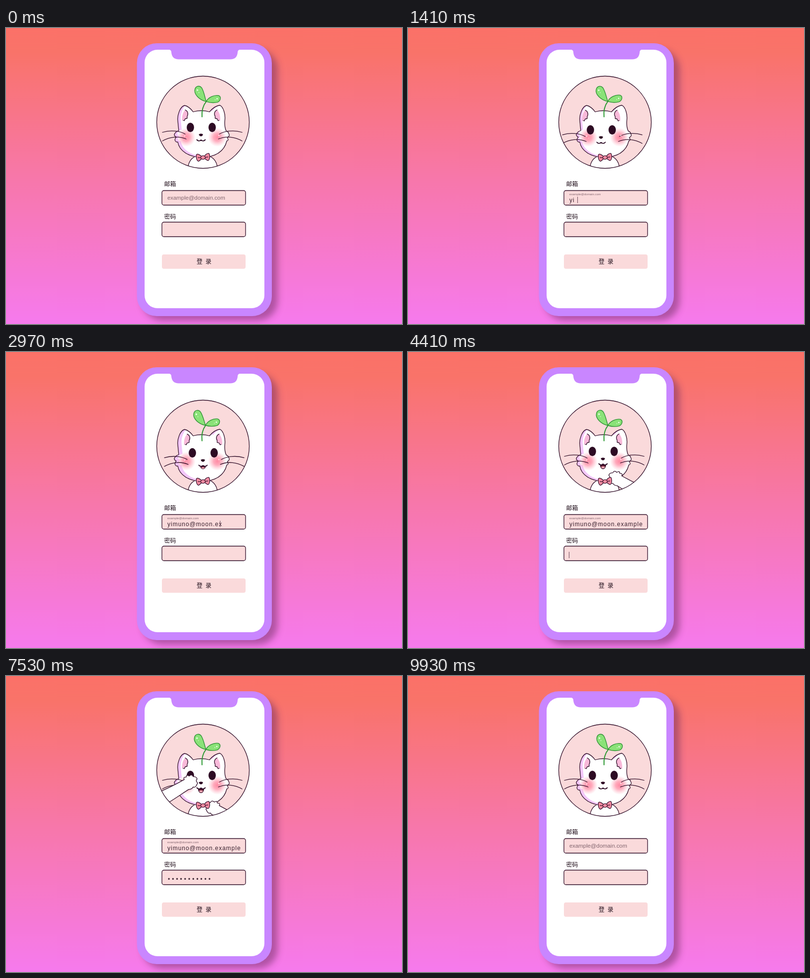
Write an HTML page that moves like this. It is 800 px wide and 600 px high and loops after 9.96 s.

```html
<!DOCTYPE html>
<html lang="zh-CN">
<head>
<meta charset="utf-8">
<title>登录</title>
<style>
  html, body { margin: 0; height: 100%; overflow: hidden; }
  svg { display: block; width: 800px; height: 600px; }
  text { font-family: "Liberation Sans", Arial, sans-serif; fill: #3a2330; }
  .label { font: 12px "Noto Sans CJK SC", "Noto Sans CJK", sans-serif; fill: #22101c; }
  .ink { stroke: #32102a; stroke-width: 1.3; stroke-linejoin: round; stroke-linecap: round; }
  .line { fill: none; }
  .skin { fill: #fff; }
  .box { fill: #fadadb; }
  .leaf { fill: #8ae278; stroke: #2f9135; stroke-width: 1.4; }
  .cursor { stroke: #6b4a5c; stroke-width: 1; }
</style>
</head>
<body>
<svg viewBox="0 0 800 600">
  <defs>
    <linearGradient id="sky" x2="0" y2="1">
      <stop stop-color="#fb7168"/><stop offset=".08" stop-color="#f97369"/>
      <stop offset=".5" stop-color="#f777a9"/><stop offset="1" stop-color="#f67aed"/>
    </linearGradient>
    <radialGradient id="blush">
      <stop stop-color="#ff8ba4"/><stop offset=".4" stop-color="#ff9bb0" stop-opacity=".85"/>
      <stop offset="1" stop-color="#ffb4c4" stop-opacity="0"/>
    </radialGradient>
    <filter id="blur" x="-20%" y="-20%" width="140%" height="140%"><feGaussianBlur stdDeviation="7"/></filter>
    <clipPath id="disc"><circle cx="398" cy="191" r="93.5"/></clipPath>
    <path id="head" d="M378 170 C374 164 367 158 361 157 C351 159 346 178 347 187 Q348 199 349 208 Q343 210 341 214 Q338 218 344 221 Q340 225 342 229 Q344 232 347 231 C350 249 369 262 396 262 C423 262 441 250 446 229 Q451 228 447 222 Q453 219 450 214 Q449 210 445 209 Q441 200 442 188 C444 175 439 160 432 156.500 Q421 158 411 170 Q395 165 378 170Z"/>
    <clipPath id="inHead"><use href="#head"/></clipPath>
    <path id="arm" class="skin ink" d="M290 228 C320 216 345 203 359 195 Q356 190 363 190 Q363 184 369 188 Q374 183 377 189 Q384 189 385 194 Q381 197 386 202 Q384 206 383 208 Q380 212 377 210 Q374 215 368 215 C354 224 337 236 320 246 L296 262Z"/>
    <g id="innerEar" class="ink" stroke-width="1">
      <path d="M362 166 C356 172 355 182 356 189 L358 186 L361 188 L362 183 L366 183 L366 179 C370 174 366 168 362 166Z" fill="#f8b9d9" stroke="none"/>
      <path class="line" d="M362 166 C367 168 369 174 366 179 L366 183 L362 184 L360 188 L358 187"/>
    </g>
    <g id="whiskers"><path d="M316 211.500 C333 206 352 209 362 215 M316 229 C330 221 348 218 364 225"/></g>
    <path id="wing" d="M396 261 C390 254 386 254 385 256 C383.500 262 385 268 388 269.500 C391 269 393 266 396 264Z"/>
  </defs>

  <rect width="800" height="600" fill="url(#sky)"/>
  <rect x="276" y="44" width="273" height="549" rx="40" fill="#6b2a60" opacity=".5" filter="url(#blur)"/>
  <rect x="264.500" y="31" width="272.500" height="553" rx="40" fill="#c986ff"/>
  <rect x="280" y="44" width="242" height="524" rx="26" fill="#fff"/>
  <path d="M328 43.500 Q334 44 334 49 Q335 63.500 349 63.500 H453 Q467 63.500 468 49 Q468 44 474 43.500Z" fill="#c986ff"/>

  <g clip-path="url(#disc)">
    <circle cx="398" cy="191" r="94" class="box"/>
    <path class="skin ink" d="M367 288 C368 267 379 257 397 258 C415 257 427 267 427.500 288Z"/>
    <g clip-path="url(#inHead)">
      <use href="#head" fill="#f3c6fb"/>
      <use id="light" href="#head" fill="#fff"/>
      <circle cx="364" cy="221.500" r="19" fill="url(#blush)"/>
      <circle cx="427" cy="221.500" r="19" fill="url(#blush)"/>
      <g id="ears"><use href="#innerEar"/><use href="#innerEar" transform="matrix(-1 0 0 1 788.500 0)"/></g>
    </g>
    <use href="#head" class="line ink"/>
    <g id="face">
      <g class="ink line"><use href="#whiskers"/><use href="#whiskers" transform="matrix(-1 0 0 1 793 0)"/></g>
      <g fill="#2d0b23">
        <ellipse cx="372.500" cy="201.500" rx="7.400" ry="9.600"/>
        <ellipse cx="416.500" cy="201.500" rx="7.400" ry="9.600"/>
        <path d="M389.500 215.500 Q394 213 398 215.500 Q397 219.500 394 219.500 Q390.500 219.500 389.500 215.500Z"/>
      </g>
      <g id="mouth">
        <path class="ink" d="M388.500 228.500 C388.500 239.500 399.500 239.500 399.500 228.500 Q396.500 230.500 394 228 Q391 230.500 388.500 228.500Z" fill="#5a1730"/>
        <path d="M390 233 Q394 230.500 398 233 Q397 236 394 236 Q391 236 390 233Z" fill="#f7a8b4"/>
      </g>
      <path class="ink line" stroke-width="1.800" style="stroke-width:1.900" d="M385.500 226.500 Q389.500 231 394 227 Q398.500 231 402.500 226.500"/>
    </g>
    <g fill="#fff" opacity=".75"><circle cx="361" cy="219" r="1.200"/><circle cx="365" cy="223" r=".8"/><circle cx="430" cy="218" r="1.200"/><circle cx="434" cy="222" r=".8"/></g>
    <g id="leftArm"><use href="#arm"/></g>
    <g id="rightArm"><use href="#arm" transform="matrix(-1 0 0 1 795 0)"/></g>
    <g class="ink" fill="#f98da3" transform="rotate(-4 398 262)">
      <use href="#wing"/><use href="#wing" transform="matrix(-1 0 0 1 796 0)"/>
      <ellipse cx="398" cy="262.500" rx="4.500" ry="3.600"/>
      <path class="line" d="M388 262 L393 262.500 M408 262 L403 262.500"/>
    </g>
    <g id="sprout">
      <path d="M396 180 C395 168 397 158 404 149" fill="none" stroke="#2f9a35" stroke-width="2" stroke-linecap="round"/>
      <path class="leaf" d="M404 149 C390 146 378 134 381 124 C383 117 391 116 395 122 C400 131 401 140 404 149Z"/>
      <path class="leaf" d="M404 149 C408 140 420 135 429 136.500 C435 139 433 147 427 150 C419 152 410 151 404 149Z"/>
      <g fill="#e9ffe2"><circle cx="386" cy="126" r="1.700"/><circle cx="389" cy="131" r=".8"/><circle cx="426" cy="143" r="1.500"/><circle cx="422" cy="145" r=".8"/></g>
    </g>
  </g>
  <circle cx="398" cy="191" r="93.500" class="line ink"/>

  <text class="label" x="319.500" y="321">邮箱</text>
  <rect x="315" y="329.500" width="169" height="29.500" rx="4" class="box ink"/>
  <text id="hint" font-size="11.400" style="fill:#83666f">example@domain.com</text>
  <text id="email" x="326" y="353" font-size="12" letter-spacing="1"></text>
  <path id="emailCursor" class="cursor" d="M0 342 V355"/>
  <text class="label" x="319.500" y="387">密码</text>
  <rect x="315" y="393.500" width="169" height="29.500" rx="4" class="box ink"/>
  <text id="password" x="327" y="416" font-size="12" letter-spacing="4"></text>
  <path id="passwordCursor" class="cursor" d="M0 405 V418"/>
  <rect x="315" y="459" width="169" height="29" rx="4" class="box"/>
  <text class="label" x="385" y="478" letter-spacing="6">登录</text>
</svg>
<script>
const LOOP = 9960, EMAIL = 'yimuno@moon.example', DOTS = '•'.repeat(11);
const $ = id => document.getElementById(id);
const ramp = (t, a, b) => Math.min(1, Math.max(0, (t - a) / (b - a)));
const ease = (t, a, b) => { const u = ramp(t, a, b); return u * u * (3 - 2 * u); };
const pulse = (t, a, b, c, d) => ease(t, a, b) - ease(t, c, d);
const move = (id, x, y) => $(id).setAttribute('transform', `translate(${x} ${y})`);

// Face offset: [time, x, y]
const GAZE = [[0, 0, 0], [500, 0, 0], [850, -5.4, 5.4], [1130, -5.4, 5.4], [3650, 7.5, 2], [4050, 0, 0],
  [8100, 0, 0], [8450, -5.3, 6.2], [8650, -5.3, 6.2], [9150, 0, 0], [LOOP, 0, 0]];

function gazeAt(t) {
  const i = GAZE.findIndex(k => k[0] > t), [t0, x0, y0] = GAZE[i - 1], [t1, x1, y1] = GAZE[i];
  const u = ramp(t, t0, t1);
  return [x0 + (x1 - x0) * u, y0 + (y1 - y0) * u];
}

function typeInto(id, text, progress, erased, span, caretOn) {
  const count = Math.floor(text.length * progress * (1 - erased) + 0.2);
  $(id).textContent = text.slice(0, count);
  move(id + 'Cursor', 325.5 + span * progress * (1 - erased), 0);
  $(id + 'Cursor').style.opacity = caretOn ? 1 : 0;
}

function setArm(id, raised, side) {
  move(id, side * 8 * (1 - raised), 104 * (1 - raised));
  $(id).style.display = raised > 0 ? '' : 'none';
}

function render(t) {
  const [x, y] = gazeAt(t);
  move('face', x, y);
  move('ears', x, y * 0.1);
  move('light', 6 + x * 0.4, -2);

  const open = 0.7 * ease(t, 1900, 2400) + 0.3 * ease(t, 3700, 4200) - ease(t, 7500, 7950);
  $('mouth').setAttribute('transform', `translate(394 228) scale(${0.7 + 0.3 * open} ${open}) translate(-394 -228)`);
  $('mouth').style.display = open > 0.02 ? '' : 'none';

  setArm('rightArm', pulse(t, 4150, 4700, 7200, 7750), -1);
  setArm('leftArm', pulse(t, 4400, 4950, 7400, 7950), 1);

  const sway = 1.2 * Math.cos(t / LOOP * 10 * Math.PI) - 0.4;
  $('sprout').setAttribute('transform', `rotate(${sway} 396 180)`);

  const small = pulse(t, 600, 950, 8560, 9000);
  $('hint').setAttribute('transform', `translate(326 ${348 - 9.3 * small}) scale(${1 - 0.455 * small})`);

  typeInto('email', EMAIL, ramp(t, 1115, 3645), ramp(t, 8100, 8450), 146, t > 1000 && t < 3750);
  const blink = t < 6000 || t % 800 < 400;
  typeInto('password', DOTS, ramp(t, 4550, 5940), ramp(t, 7700, 8050), 91, t > 4050 && t < 7150 && blink);
}

function tick(now) {
  render(now % LOOP);
  requestAnimationFrame(tick);
}
render(0);
requestAnimationFrame(tick);
</script>
</body>
</html>
```
